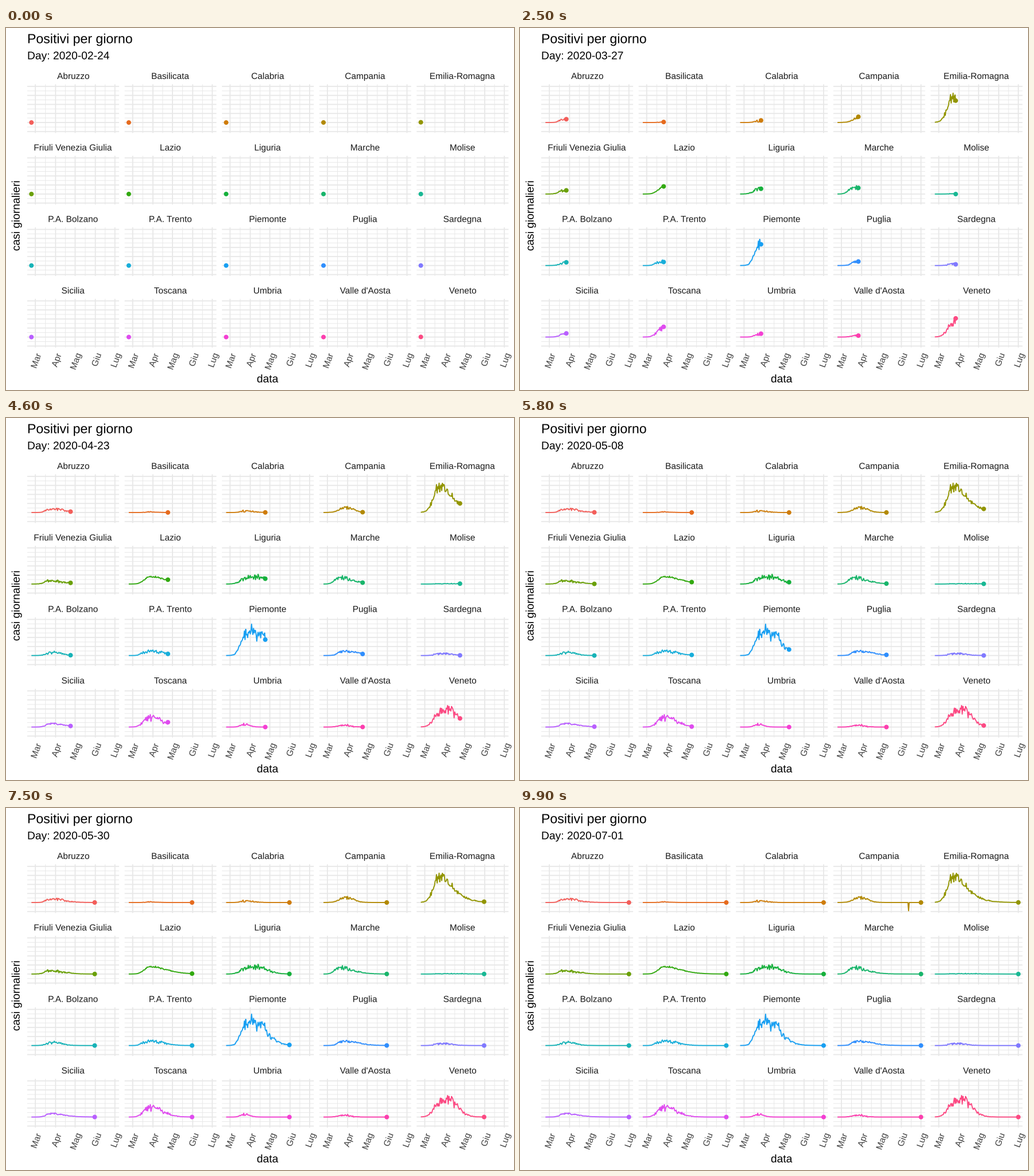
These frames come from a looping animation (885x632 px, 10000 ms). A matplotlib script:

```python
import matplotlib.pyplot as plt
import numpy as np
from matplotlib.animation import FuncAnimation
from matplotlib.collections import LineCollection
from matplotlib.patches import Circle, PathPatch
from matplotlib.textpath import TextPath
from matplotlib.transforms import Affine2D

W, H, DPI = 885, 632, 100
FRAMES, LAST = 100, 128
START = np.datetime64("2020-02-24")
DAYS = np.arange(LAST + 1)

# Panel geometry in pixels
X0, DX, DAY = 44.3, 169.6, 1.1362
Y0, DY, CASE = 165.0, 124.85, 0.0631
PAD = LAST * DAY * 0.05
TOP, BOTTOM = 66.7, 18.3

# name, colour, level, day and pace of the rise, day and pace of the fall, noise
REGIONS = [
    ("Abruzzo", "#F35E5A", 120, 22, 3, 48, 10, 0.28),
    ("Basilicata", "#E66B1E", 22, 26, 3, 42, 6, 0.35),
    ("Calabria", "#CF7C0A", 50, 22, 3, 42, 6, 0.4),
    ("Campania", "#B28902", 210, 27, 5, 44, 6, 0.2),
    ("Emilia-Romagna", "#929500", 1250, 20.5, 4, 39, 14, 0.12),
    ("Friuli Venezia Giulia", "#6AA008", 130, 20, 3, 46, 10, 0.28),
    ("Lazio", "#32A910", 240, 23, 3.5, 58, 13, 0.08),
    ("Liguria", "#16B03C", 200, 20.5, 3.5, 66, 7, 0.24),
    ("Marche", "#18B56B", 250, 17.5, 3, 41, 11, 0.18),
    ("Molise", "#19B894", 10, 22, 3, 75, 8, 0.6),
    ("P.A. Bolzano", "#17B3B7", 95, 22, 3.5, 49, 6, 0.28),
    ("P.A. Trento", "#18AEDA", 130, 19, 2.5, 56, 8, 0.28),
    ("Piemonte", "#189FF2", 700, 22, 3.2, 64, 9, 0.18),
    ("Puglia", "#2F8EFD", 150, 23, 3.5, 52, 11, 0.2),
    ("Sardegna", "#8079FF", 65, 21, 3, 47, 8, 0.4),
    ("Sicilia", "#B95FFF", 150, 23, 3, 43, 12, 0.14),
    ("Toscana", "#DF4CEF", 300, 21.5, 3.5, 53, 8.5, 0.2),
    ("Umbria", "#F43FD3", 95, 22, 2.5, 36, 4, 0.2),
    ("Valle d'Aosta", "#FC3FAE", 50, 21, 3, 43, 5, 0.5),
    ("Veneto", "#FC4A83", 530, 20.5, 4.2, 58, 6.5, 0.18),
]
CORRECTION = ("Campania", 109, -229)


def wave(seed, level, up, rise, down, fall, noise):
    """Logistic rise times logistic fall, with day-to-day scatter."""
    rng = np.random.default_rng(seed)
    trend = level / (1 + np.exp((up - DAYS) / rise))
    trend /= 1 + np.exp((DAYS - down) / fall)
    scatter = np.clip(rng.normal(size=DAYS.size), -2, 2.5)
    return trend * (1 + noise * scatter)


def px(pixels):
    return pixels * 72 / DPI


fig = plt.figure(figsize=(W / DPI, H / DPI), dpi=DPI, facecolor="white")
ax = fig.add_axes([0, 0, 1, 1])
ax.set_xlim(0, W)
ax.set_ylim(H, 0)
ax.axis("off")


def outline(text, size):
    return TextPath((0, 0), text, size=size, prop={"family": "Liberation Sans"})


def write(x, y, text, size, color="black", align=0.0, angle=0):
    """Place text on a baseline; align runs from 0 (left) to 1 (right)."""
    path = outline(text, size)
    shift = -align * (path.get_extents().x0 + path.get_extents().x1)
    if align == 1:
        shift = -path.get_extents().x1
    place = (Affine2D().translate(shift, 0).scale(1, -1)
             .rotate_deg(-angle).translate(x, y))
    patch = PathPatch(path, fc=color, lw=0, zorder=5, snap=False,
                      transform=place + ax.transData)
    return ax.add_artist(patch)


def add_grid(x0, y0, xs, ys, width):
    left, right = x0 - PAD, x0 + LAST * DAY + PAD
    lines = [[(left, y0 - v * CASE), (right, y0 - v * CASE)] for v in ys]
    lines += [[(x0 + d * DAY, y0 - TOP), (x0 + d * DAY, y0 + BOTTOM)]
              for d in xs]
    ax.add_collection(LineCollection(lines, colors="#E8E8E8", snap=False,
                                     linewidths=px(width), zorder=1))


MONTHS = {"Mar": 6, "Apr": 37, "Mag": 67, "Giu": 98, "Lug": 128}
major_x = np.array(list(MONTHS.values()))
minor_x = (major_x[1:] + major_x[:-1]) / 2
major_y = np.arange(-250, 1001, 250)
minor_y = major_y[:-1] + 125

curves = []
for i, (name, color, *shape) in enumerate(REGIONS):
    row, col = divmod(i, 5)
    x0, y0 = X0 + col * DX, Y0 + row * DY
    cases = wave(i, *shape)
    if name == CORRECTION[0]:
        cases[CORRECTION[1]] = CORRECTION[2]

    add_grid(x0, y0, minor_x, minor_y, 0.95)
    add_grid(x0, y0, major_x, major_y, 1.87)
    write(x0 + LAST * DAY / 2, y0 - 76, name, 15.4, "#1A1A1A", 0.5)
    if row == 3:
        for month, day in MONTHS.items():
            write(x0 + day * DAY + 10.4, 570.5, month, 15.4, "#404040", 1, 70)

    line, = ax.plot([], [], color=color, lw=px(1.87), zorder=3, snap=False,
                    solid_capstyle="butt", solid_joinstyle="round")
    dot = ax.add_patch(Circle((x0, y0), 4, fc=color, lw=0, zorder=4))
    curves.append((line, dot, x0 + DAYS * DAY, y0 - cases * CASE))

write(37, 26.5, "Positivi per giorno", 23.1)
subtitle = write(37, 54.6, "Day: ", 19.25)
write(456, 618.7, "data", 19.25, align=0.5)
write(23.7, 328, "casi giornalieri", 19.25, align=0.5, angle=90)


def update(frame):
    # The head snaps to whole days, slightly ahead of the printed date.
    steps = FRAMES - 1
    head = min((2 * frame + 1) * LAST // (2 * steps), LAST)
    date = START + frame * LAST // steps
    subtitle.set_path(outline(f"Day: {date}", 19.25))
    for line, dot, x, y in curves:
        line.set_data(x[:head + 1], y[:head + 1])
        dot.center = x[head], y[head]
    return [subtitle]


anim = FuncAnimation(fig, update, frames=FRAMES, interval=100,
                     repeat=True, repeat_delay=0, blit=False)
plt.show()
```
